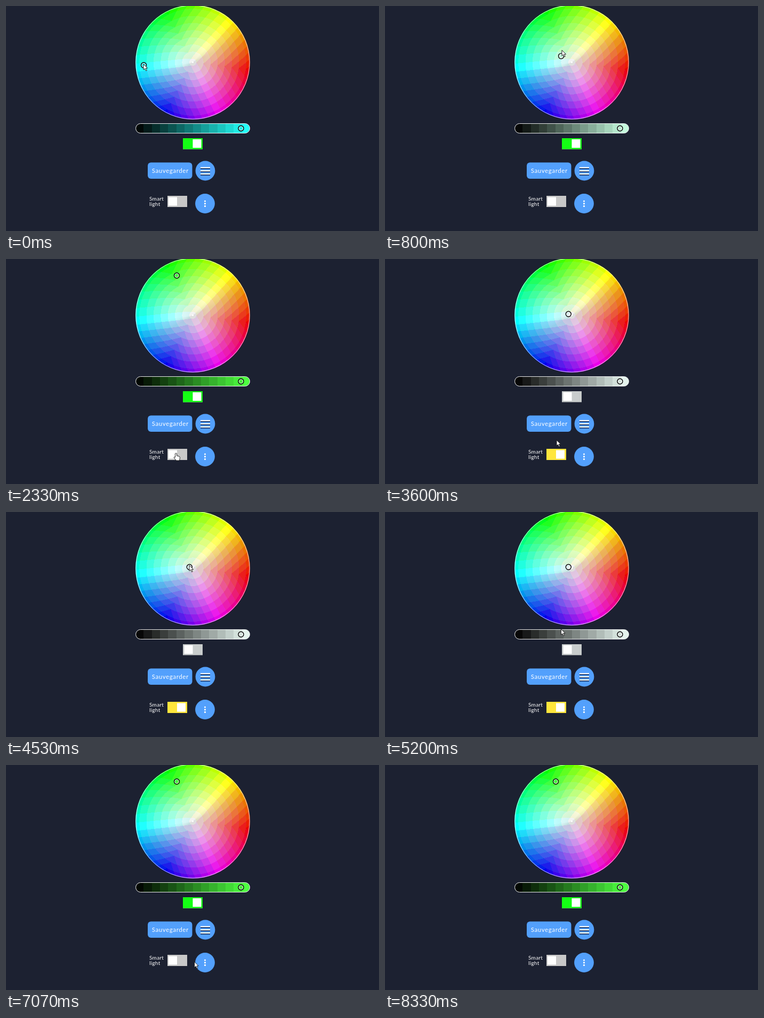
Animation of 700 by 422 pixels, one loop 8390 ms. Source, as an HTML page with a canvas:

```html
<!DOCTYPE html>
<html lang="fr">
<head>
<meta charset="utf-8">
<title>Color wheel</title>
<style>
html, body { margin: 0; width: 100%; height: 100%; overflow: hidden; background: #1c2131; }
#wheel { position: absolute; left: 243px; top: -2px; border-radius: 50%; }
svg { position: absolute; left: 0; top: 0; }
text { font-family: Lato, sans-serif; fill: #fff; }
.blue { fill: #53a0fc; }
</style>
</head>
<body>
<canvas id="wheel" width="215" height="215"></canvas>
<svg width="700" height="422" viewBox="0 0 700 422">
  <defs>
    <clipPath id="pill"><rect x="243.5" y="220.5" width="214" height="18" rx="9"/></clipPath>
    <g id="ring" fill="none">
      <circle r="3.8" stroke="#fff" stroke-width="1.1"/>
      <circle r="5" stroke="#000" stroke-width="1.4"/>
    </g>
  </defs>
  <circle cx="350.5" cy="105.5" r="1.6" fill="#fff"/>
  <circle cx="350.5" cy="105.5" r="106.6" fill="none" stroke="#fff" stroke-width=".8"/>

  <g id="bands" clip-path="url(#pill)"></g>
  <rect x="243.5" y="220.5" width="214" height="18" rx="9" fill="none" stroke="#fff" stroke-width=".9"/>
  <use href="#ring" x="441" y="229.5"/>

  <g id="power">
    <rect x="332" y="248" width="37" height="20.5" fill="#c8cccc"/>
    <rect class="on" x="332" y="248" width="37" height="20.5" fill="#14ff14"/>
    <rect class="knob" x="334.5" y="250" width="16" height="16" fill="#fff"/>
  </g>

  <rect class="blue" x="266" y="293.5" width="83.5" height="30.5" rx="6"/>
  <text x="308.2" y="313" font-size="11.5" letter-spacing=".6" text-anchor="middle">Sauvegarder</text>
  <circle class="blue" cx="374" cy="309" r="18.4"/>
  <path d="M365 305h18m-18 6h18m-18 6h18" stroke="#27477a" stroke-width="1.8"/>
  <path d="M365 303h18m-18 6h18m-18 6h18" stroke="#fff" stroke-width="2"/>

  <text font-size="10" letter-spacing=".3"><tspan x="269" y="365">Smart</tspan><tspan x="269" y="374.5">light</tspan></text>
  <g id="smart">
    <rect x="303" y="356" width="37" height="21" fill="#c8c8c8"/>
    <rect class="on" x="303" y="356" width="37" height="21" fill="#ffe63c"/>
    <rect class="knob" x="305" y="358.5" width="16" height="16" fill="#fff"/>
  </g>
  <circle class="blue" cx="373.5" cy="370.5" r="18.4"/>
  <g fill="#fff">
    <circle cx="373.5" cy="366" r="1.6"/><circle cx="373.5" cy="370.7" r="1.6"/><circle cx="373.5" cy="375.4" r="1.6"/>
  </g>

  <use id="handle" href="#ring"/>
  <g id="cursor" fill="#fff" stroke="#111" stroke-width=".9" stroke-linejoin="round">
    <path id="arrow" d="M0 0v10.5l2.5-2.2 2 4.2 1.8-.8-2-4.1h3.4z"/>
    <path id="hand" d="M-1.5 1q1.5-2 3 0v4l4 1q2 .7 2 2.5l-1 5.5h-6l-4.5-5.5q0-2 2.5-.5z"/>
  </g>
</svg>
<script>
const LOOP = 8390, CX = 350.5, CY = 105.5, R = 107, LEVELS = 8;
const SMART_ON = 2470, SMART_OFF = 6130, SLIDE = 200;
const $ = s => document.querySelector(s);
const clamp = v => Math.max(0, Math.min(1, v));

// Hue runs unevenly: yellow sits at 48 degrees, cyan at 188.
function hueAt(deg) {
  const a = deg < 48 ? deg + 360 : deg;
  return a < 188 ? 60 + (a - 48) / 140 * 122 : 182 + (a - 188) / 220 * 238;
}

// Full brightness from yellow to cyan, dimmer on the red and blue side and at the middle.
function brightness(hue, s) {
  const dim = clamp(Math.min(hue - 182, 420 - hue) / 25);
  return (1 - 0.08 * dim) * (0.94 + 0.06 * clamp(3 * s));
}

function wheelColor(dx, dy, stepped) {
  const deg = (Math.atan2(-dy, dx) * 180 / Math.PI + 360) % 360;
  const s = Math.min(1, Math.hypot(dx, dy) / R);
  const hue = hueAt(deg), v = brightness(hue, s);
  return [5, 3, 1].map(n => {
    const k = (n + hue / 60) % 6;
    let c = 1 - s * Math.max(0, Math.min(k, 4 - k, 1));
    if (stepped) c = Math.round(c * LEVELS) / LEVELS;
    return Math.round(255 * v * c);
  });
}

function paintWheel() {
  const size = 215, ctx = $('#wheel').getContext('2d');
  const img = ctx.createImageData(size, size);
  for (let y = 0, i = 0; y < size; y++)
    for (let x = 0; x < size; x++, i += 4)
      img.data.set([...wheelColor(x - 107, y - 107, true), 255], i);
  ctx.putImageData(img, 0, 0);
}

const BANDS = 14;
const bands = Array.from({ length: BANDS }, (_, i) => {
  const r = document.createElementNS('http://www.w3.org/2000/svg', 'rect');
  const x = Math.round(243 + i * 215 / BANDS);
  for (const [k, v] of Object.entries({ x, y: 220, width: 17, height: 19 })) r.setAttribute(k, v);
  return $('#bands').appendChild(r);
});

// time, x, y of the pointer tip
const PATH = [
  [0, 258, 109], [70, 258, 109], [430, 312, 112], [740, 330, 92], [800, 332, 83],
  [1150, 320, 29], [1400, 320, 29], [1730, 322, 180], [1800, 322, 190], [2260, 319, 364],
  [3470, 319, 364], [3600, 322, 340], [3730, 325, 300], [3870, 325, 300], [4400, 344, 100],
  [4870, 344, 100], [5600, 314, 364], [6930, 314, 364], [7200, 390, 374], [7560, 560, 400]
];

function pointer(t) {
  const i = PATH.findIndex(p => p[0] > t);
  if (i < 0) return PATH[PATH.length - 1].slice(1);
  if (i === 0) return PATH[0].slice(1);
  const [t0, x0, y0] = PATH[i - 1], [t1, x1, y1] = PATH[i];
  const u = (t - t0) / (t1 - t0);
  return [x0 + (x1 - x0) * u, y0 + (y1 - y0) * u];
}

function setSwitch(id, p) {
  $(id + ' .on').style.opacity = p;
  $(id + ' .knob').setAttribute('transform', `translate(${16 * p} 0)`);
}

const place = (el, x, y) => el.setAttribute('transform', `translate(${x} ${y})`);

function draw(t) {
  const smart = t >= SMART_ON && t < SMART_OFF;
  const p = clamp((t - SMART_ON) / SLIDE) - clamp((t - SMART_OFF) / SLIDE);
  setSwitch('#smart', p);
  setSwitch('#power', 1 - p);

  // The handle trails the pointer while dragged.
  const drag = pointer(Math.min(t - 60, 1200));
  const [hx, hy] = smart ? [344.3, 103.3] : [drag[0] + 0.5, drag[1] + 2];
  place($('#handle'), hx, hy);
  const rgb = wheelColor(hx - CX, hy - CY, false);
  bands.forEach((b, i) => b.setAttribute('fill', `rgb(${rgb.map(c => Math.round(c * (i + 0.4) / (BANDS - 0.6)))})`));

  const [x, y] = pointer(t);
  const over = x > 303 && x < 340 && y > 356 && y < 377;
  place($('#cursor'), x, y);
  $('#cursor').style.display = t < 7560 ? '' : 'none';
  $('#arrow').style.display = over ? 'none' : '';
  $('#hand').style.display = over ? '' : 'none';
}

paintWheel();
const start = performance.now();
function tick() {
  draw((performance.now() - start) % LOOP);
  requestAnimationFrame(tick);
}
tick();
</script>
</body>
</html>
```
